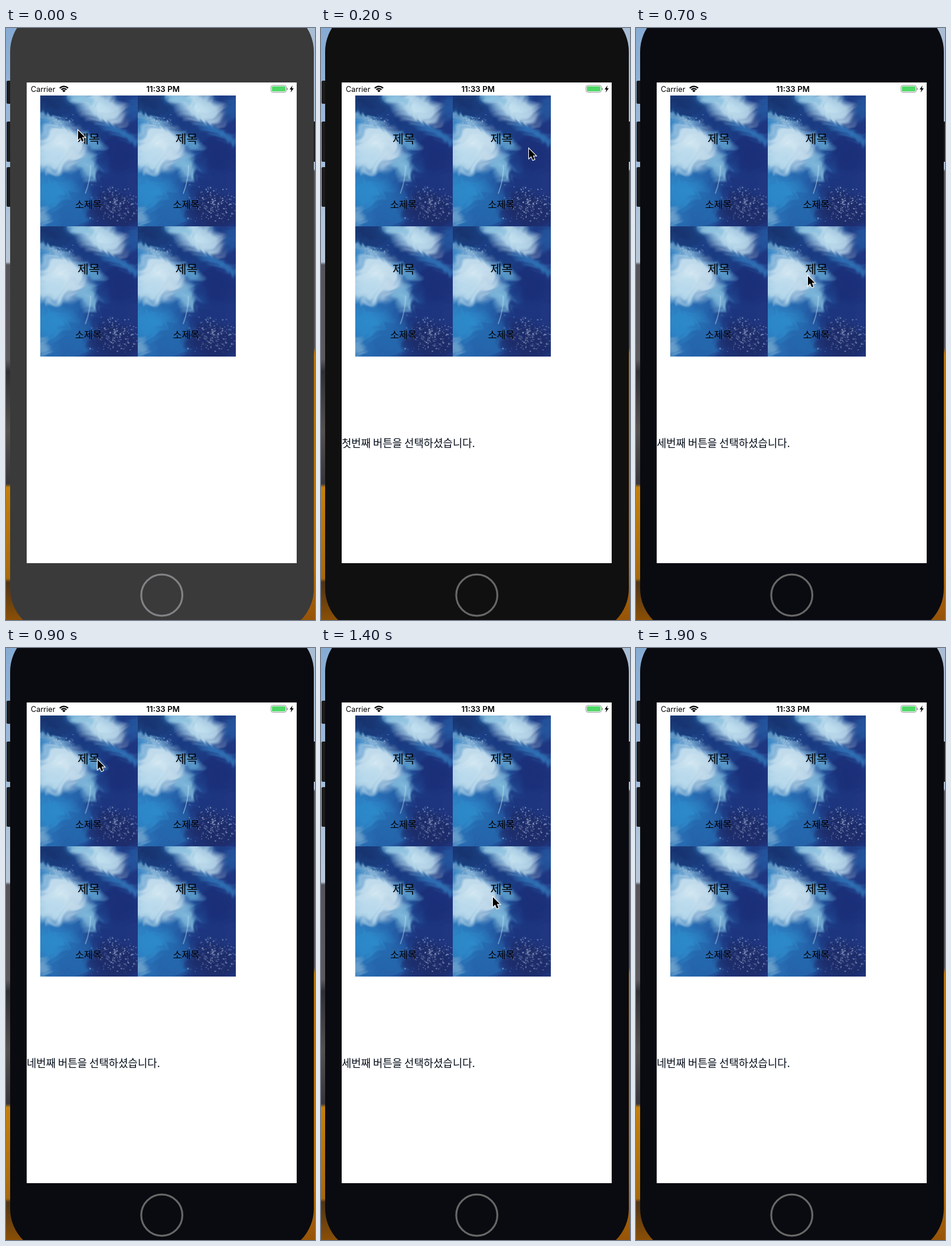
Animation of 523x1000 px, one loop 2000 ms. Source, as an HTML page with a canvas:

```html
<!DOCTYPE html>
<html lang="ko">
<head>
<meta charset="utf-8">
<style>
html, body { margin: 0; width: 100%; height: 100%; overflow: hidden; }
canvas { display: block; }
</style>
</head>
<body>
<canvas id="stage" width="523" height="1000"></canvas>
<script>
const ctx = document.getElementById('stage').getContext('2d');
const LATIN = 'Inter, sans-serif';
const KOREAN = '"Noto Sans CJK KR", "Noto Sans CJK", sans-serif';
const STEP = 100, LOOP = 2000;

// Pointer position at given step; gaps are interpolated
const pointerKeys = [
  [0, 121, 172], [1, 121, 172], [2, 351, 203], [3, 340, 205],
  [5, 171, 406], [6, 178, 412], [7, 290, 418], [9, 154, 188],
  [10, 156, 190], [11, 310, 200], [12, 300, 206], [13, 175, 412],
  [14, 290, 420], [16, 292, 422], [17, 310, 480], [18, 335, 700], [19, 360, 1010]
];
// Step at which each ordinal replaces the previous one
const labelKeys = [[2, '첫'], [4, '두'], [6, '세'], [8, '네'], [10, '첫'], [12, '두'], [14, '세'], [15, '네']];

function box(c, color, x, y, w, h, r = 0) {
  c.fillStyle = color;
  c.beginPath();
  c.roundRect(x, y, w, h, r);
  c.fill();
}

function text(str, x, y, font, align = 'center', color = '#000') {
  ctx.font = font;
  ctx.textAlign = align;
  ctx.fillStyle = color;
  ctx.fillText(str, x, y);
}

function verticalGradient(stops, height) {
  const g = ctx.createLinearGradient(0, 0, 0, height);
  for (const [y, color] of stops) g.addColorStop(y / height, color);
  return g;
}

// Bends the soft shapes into swirls
function swirl(c, w, h) {
  const from = c.getImageData(0, 0, w, h);
  const to = c.createImageData(w, h);
  const source = new Uint32Array(from.data.buffer);
  const target = new Uint32Array(to.data.buffer);
  const clamp = (v, max) => Math.max(0, Math.min(max - 1, Math.round(v)));
  for (let y = 0; y < h; y++) {
    for (let x = 0; x < w; x++) {
      const a = Math.sin(x / 13 + 2 * Math.sin(y / 17));
      const b = Math.sin(y / 9 - x / 15 + 2 * a);
      const fine = Math.sin(x / 4 + y / 3 + 3 * b);
      const sx = clamp(x + 4 * b + 2 * fine, w);
      const sy = clamp(y + 4 * a + 2.5 * fine, h);
      target[y * w + x] = source[sy * w + sx];
    }
  }
  c.putImageData(to, 0, 0);
}

function makeSea() {
  const sea = document.createElement('canvas');
  const w = sea.width = 166;
  const h = sea.height = 221;
  const c = sea.getContext('2d');
  const base = c.createLinearGradient(0, 90, 166, 130);
  base.addColorStop(0, '#2f7fc2');
  base.addColorStop(0.45, '#2460a8');
  base.addColorStop(0.75, '#1d3680');
  base.addColorStop(1, '#203680');
  box(c, base, 0, 0, w, h);

  // x, y, radii, tilt, colour
  const blobs = [
    [15, 12, 62, 32, 0.2, '#17326f'], [78, 48, 66, 20, 0.5, '#1a3a80'],
    [105, 22, 56, 32, 0.35, '#c4e2f0'], [72, 6, 30, 12, 0.4, '#8fc3e0'],
    [162, 22, 20, 30, 0, '#24569e'], [140, 64, 50, 14, 0.4, '#2f70b4'],
    [20, 40, 36, 9, 0.1, '#6ca0c9'], [132, 100, 48, 34, 0.6, '#1a2f78'],
    [25, 165, 44, 34, 0, '#2d8aca'], [38, 84, 56, 46, 0.3, '#d6eaf3'],
    [18, 108, 36, 30, 0, '#bcdced'], [82, 122, 22, 34, -0.3, '#80b9db'],
    [92, 76, 32, 12, 0.6, '#5b9bcb'], [118, 150, 40, 28, -0.4, '#1c357e'],
    [62, 190, 34, 36, 0.3, '#2568ae'], [128, 196, 56, 42, 0, '#1d2b68'],
    [6, 204, 14, 24, 0, '#6aa0cc']
  ];
  for (const [x, y, rx, ry, tilt, color] of blobs) {
    c.save();
    c.translate(x, y);
    c.rotate(tilt);
    c.scale(rx, ry);
    const g = c.createRadialGradient(0, 0, 0, 0, 0, 1);
    g.addColorStop(0, color);
    g.addColorStop(0.5, color + 'd8');
    g.addColorStop(1, color + '00');
    c.fillStyle = g;
    c.fillRect(-1, -1, 2, 2);
    c.restore();
  }
  swirl(c, w, h);

  let seed = 7;
  const random = () => (seed = seed * 16807 % 2147483647) / 2147483647;
  const foam = (count, x, y, width, height) => {
    for (let i = 0; i < count; i++) {
      const px = x + (random() + random()) / 2 * width;
      const py = y + (random() + random()) / 2 * height;
      c.fillStyle = `rgba(195, 215, 240, ${0.15 + random() * 0.45})`;
      c.fillRect(px, py, 0.7 + random() * 2, 0.7 + random() * 1.6);
    }
  };
  foam(230, 82, 145, 88, 74);
  foam(45, 0, 30, 62, 22);

  c.strokeStyle = '#b5d5e8a0';
  c.lineWidth = 1.5;
  c.beginPath();
  c.moveTo(86, 118);
  c.quadraticCurveTo(86, 142, 77, 166);
  c.stroke();
  return sea;
}

const sea = makeSea();
const leftScene = verticalGradient([
  [0, '#86abd3'], [240, '#a5bfdc'], [395, '#b9c8d8'], [400, '#56545a'], [560, '#5d5a5e'],
  [580, '#303034'], [680, '#55514f'], [770, '#38363a'], [776, '#c5800a'],
  [930, '#a8690c'], [936, '#4e3417'], [1000, '#8a4f06']
], 1000);
const rightScene = verticalGradient([
  [0, '#a9bdd4'], [238, '#b0c1d5'], [242, '#55545a'], [540, '#555158'],
  [550, '#b8750b'], [900, '#b97008'], [1000, '#965408']
], 1000);

function drawPhone(step) {
  box(ctx, leftScene, 0, 0, 262, 1000);
  box(ctx, rightScene, 262, 0, 261, 1000);
  for (const [y, h] of [[89, 39], [158, 68], [235, 67]]) box(ctx, '#1b1b1c', 1, y, 10, h, 2);
  box(ctx, '#1b1b1c', 515, 158, 8, 68);
  box(ctx, step < 2 ? '#3a3a3a' : step < 3 ? '#101010' : '#0a0b10', 7, -35, 514, 1057, 75);
  ctx.strokeStyle = step < 2 ? '#828286' : '#676767';
  ctx.lineWidth = 3.2;
  ctx.beginPath();
  ctx.arc(263.7, 958, 34.8, 0, 7);
  ctx.stroke();
  box(ctx, '#fff', 35, 92, 457, 812);
}

function drawStatusBar() {
  text('Carrier', 42, 108, '12.7px ' + LATIN, 'left');
  text('11:33 PM', 265.7, 108, '600 13.3px ' + LATIN);
  ctx.strokeStyle = '#000';
  ctx.lineWidth = 2.4;
  for (const r of [5.8, 9.6]) {
    ctx.beginPath();
    ctx.arc(98, 108.2, r, -Math.PI * 0.76, -Math.PI * 0.24);
    ctx.stroke();
  }
  ctx.fillStyle = '#000';
  ctx.beginPath();
  ctx.moveTo(98, 108.5);
  ctx.arc(98, 108.5, 3.7, -Math.PI * 0.76, -Math.PI * 0.24);
  ctx.fill();

  ctx.strokeStyle = '#8f9296';
  ctx.lineWidth = 1;
  ctx.beginPath();
  ctx.roundRect(448.5, 97, 26, 11.5, 3);
  ctx.stroke();
  box(ctx, '#4fd866', 450, 98.5, 23, 8.5, 1.5);
  box(ctx, '#8f9296', 475.5, 101, 1.5, 4, 1);
  ctx.fillStyle = '#000';
  ctx.fill(new Path2D('M485 97L480 103.8h3L481.7 109L487 101.8h-3.1z'));
}

function drawCards() {
  for (const y of [114, 334.5]) {
    for (const x of [57.5, 223]) {
      ctx.drawImage(sea, x, y, 165.5, 220.5);
      text('제목', x + 82.5, y + 80.5, '20.7px ' + KOREAN);
      text('소제목', x + 82, y + 189.5, '16.4px ' + KOREAN);
    }
  }
}

function drawPointer(step) {
  const next = pointerKeys.findIndex(key => key[0] >= step);
  const [s1, x1, y1] = pointerKeys[next];
  const [s0, x0, y0] = pointerKeys[Math.max(0, next - 1)];
  const k = s1 > s0 ? (step - s0) / (s1 - s0) : 1;
  ctx.save();
  ctx.translate(x0 + (x1 - x0) * k, y0 + (y1 - y0) * k);
  const arrow = new Path2D('M1 1V17L4.8 13.6L7.6 20L10.4 18.8L7.7 12.6H12.6Z');
  ctx.strokeStyle = '#fff';
  ctx.lineWidth = 2.2;
  ctx.stroke(arrow);
  ctx.fillStyle = '#000';
  ctx.fill(arrow);
  ctx.restore();
}

function frame(now) {
  const step = Math.floor(now % LOOP / STEP);
  drawPhone(step);
  drawStatusBar();
  drawCards();
  const label = labelKeys.findLast(key => key[0] <= step);
  if (label) text(label[1] + '번째 버튼을 선택하셨습니다.', 35, 707.5, '17.8px ' + KOREAN, 'left', '#020b18');
  drawPointer(step);
  requestAnimationFrame(frame);
}
requestAnimationFrame(frame);
</script>
</body>
</html>
```
